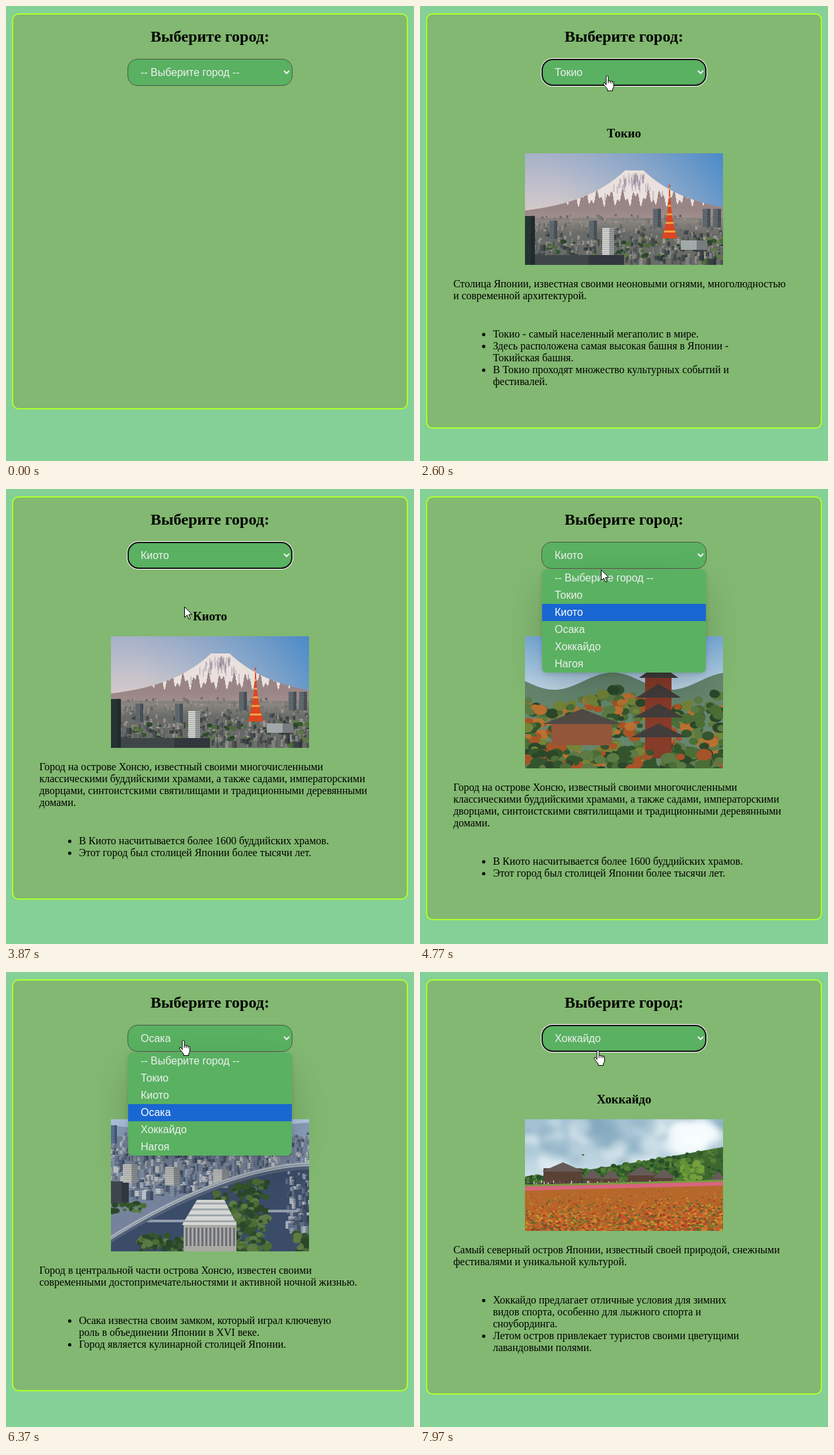
Write an HTML page with a canvas that moves like this. It is 618 px wide and 689 px high and loops after 8000 ms.

```html
<!DOCTYPE html>
<html lang="ru">
<head>
<meta charset="utf-8">
<title>Выбор города</title>
<style>
  html, body { margin: 0; width: 100%; height: 100%; overflow: hidden; background: #85d096; }
  #stage { position: relative; width: 618px; height: 689px; overflow: hidden;
    font: 16px/18px "Liberation Serif", "Times New Roman", serif; color: #000; }
  #stage > * { position: absolute; box-sizing: border-box; margin: 0; white-space: pre; }
  #panel { left: 9px; top: 11px; width: 600px; background: #82b871; border: 2px solid #adff2f; border-radius: 10px; }
  h2, h3 { left: 9px; width: 600px; text-align: center; }
  h2 { top: 33px; font-size: 24px; line-height: 27px; }
  h3 { top: 182px; font-size: 18.72px; line-height: 21px; }
  canvas { left: 159px; top: 223px; }
  #about { left: 50.400px; }
  #facts { left: 110.400px; padding: 0; list-style: disc; }
  #select, #popup { font: 16px "Liberation Sans", Arial, sans-serif; color: #f0f0f0; background: #59b161; }
  #select { left: 184px; top: 80px; width: 250px; height: 41px; line-height: 39px; padding-left: 19px;
    border: 1px solid #4b5a4c; border-radius: 15px; }
  #select.ring { border: 2px solid #101010; border-radius: 17px; line-height: 37px; padding-left: 18px; box-shadow: 0 0 0 1px #fff; }
  #popup { left: 185px; top: 122px; width: 248px; height: 156px; border-radius: 7px;
    box-shadow: 0 24px 60px -4px rgba(0, 0, 0, .2), 0 2px 6px rgba(0, 0, 0, .14); }
  #popup div { height: 26px; line-height: 25px; padding-left: 19px; }
  #popup div:first-child { border-radius: 7px 7px 0 0; }
  #popup div:last-child { border-radius: 0 0 7px 7px; }
  #popup .hot { background: #1967d2; color: #fff; }
  #chevron { left: 419px; top: 95px; }
  .cursor { left: 0; top: 0; overflow: visible; }
</style>
</head>
<body>
<div id="stage">
  <div id="panel"></div>
  <h2>Выберите город:</h2>
  <div id="select"></div>
  <svg id="chevron" width="12" height="10"><path d="M2 3l4 4 4-4" fill="none" stroke="#f0f0f0" stroke-width="2"/></svg>
  <h3 id="name"></h3>
  <p id="about"></p>
  <ul id="facts"></ul>
  <div id="popup"></div>
  <svg class="cursor" id="arrow" width="14" height="21"><path d="M.5 .5V16.500L4.300 13 7 19 9.400 18 6.800 12H11.800Z" fill="#fff" stroke="#000"/></svg>
  <svg class="cursor" id="hand" width="18" height="25">
    <path d="M5 14.500V2.200a1.600 1.600 0 0 1 3.200 0V8.500q1.500-1.200 3 .4 1.600-.9 2.800.6 2.300-.8 2.500 1.500V16q0 2.500-1.800 5v2.500H7V21Q4.500 18 1 13.500q-.8-2 1-2.200 1.500 0 3 3.200Z" fill="#fff" stroke="#000"/>
    <path d="M8.200 8v4M11.200 9v3M14 9.600v3" stroke="#000"/>
  </svg>
</div>
<script>
const LOOP = 8000, LOAD = 30, ROW = 26;
const $ = id => document.getElementById(id);

const cities = [
  { name: '-- Выберите город --' },
  { name: 'Токио',
    about: 'Столица Японии, известная своими неоновыми огнями, многолюдностью\nи современной архитектурой.',
    facts: ['Токио - самый населенный мегаполис в мире.',
      'Здесь расположена самая высокая башня в Японии -\nТокийская башня.',
      'В Токио проходят множество культурных событий и\nфестивалей.'] },
  { name: 'Киото',
    about: 'Город на острове Хонсю, известный своими многочисленными\nклассическими буддийскими храмами, а также садами, императорскими\nдворцами, синтоистскими святилищами и традиционными деревянными\nдомами.',
    facts: ['В Киото насчитывается более 1600 буддийских храмов.',
      'Этот город был столицей Японии более тысячи лет.'] },
  { name: 'Осака',
    about: 'Город в центральной части острова Хонсю, известен своими\nсовременными достопримечательностями и активной ночной жизнью.',
    facts: ['Осака известна своим замком, который играл ключевую\nроль в объединении Японии в XVI веке.',
      'Город является кулинарной столицей Японии.'] },
  { name: 'Хоккайдо',
    about: 'Самый северный остров Японии, известный своей природой, снежными\nфестивалями и уникальной культурой.',
    facts: ['Хоккайдо предлагает отличные условия для зимних\nвидов спорта, особенно для лыжного спорта и\nсноубординга.',
      'Летом остров привлекает туристов своими цветущими\nлавандовыми полями.'] },
  { name: 'Нагоя' },
];

// Each visit: go over the select, open it, drop to a row, pick the next city.
const visits = [
  { go: [200, 770], over: [290, 92], open: 1030, drop: [1470, 1800], row: [284, 161], pick: 2070 },
  { go: [2330, 2600], over: [283.5, 105], open: 2770, drop: [3030, 3370], row: [270, 178], pick: 3870 },
  { go: [3900, 4370], over: [274, 103], open: 4430, drop: [4700, 5200], row: [271, 221], pick: 5570 },
  { go: [5700, 6200], over: [268, 103], open: 6270, drop: [6470, 6970], row: [257, 233], pick: 7500 },
  { go: [7530, 7970], over: [269.5, 118] },
];
const START = [545, 520];
const legs = visits.flatMap(v => [[v.go, v.over], [v.drop, v.row]]).filter(leg => leg[0]);

// ---- pictures ----
function seeded(s) {
  return () => {
    s = (s + 0x6d2b79f5) | 0;
    let t = Math.imul(s ^ (s >>> 15), 1 | s);
    t = (t + Math.imul(t ^ (t >>> 7), 61 | t)) ^ t;
    return ((t ^ (t >>> 14)) >>> 0) / 4294967296;
  };
}

function brush(g, seed) {
  const rnd = seeded(seed);
  const span = (a, b) => a + rnd() * (b - a);
  const pick = list => list[Math.floor(rnd() * list.length)];
  const rect = (c, x, y, w, h) => { g.fillStyle = c; g.fillRect(x, y, w, h); };
  const fade = (y0, y1, ...colors) => {
    const f = g.createLinearGradient(0, y0, 0, y1);
    colors.forEach((c, i) => f.addColorStop(i / (colors.length - 1), c));
    rect(f, 0, y0, 300, y1 - y0);
  };
  // Fills between two curves of x
  const band = (c, top, low = () => 200, x0 = 0, x1 = 300) => {
    for (let x = x0; x < x1; x++) rect(c, x, top(x), 1, Math.max(0, low(x) - top(x)));
  };
  const blobs = (n, x0, x1, top, low, r, colors) => {
    for (let i = 0; i < n; i++) {
      const x = span(x0, x1), s = r * span(.5, 1.2);
      g.fillStyle = pick(colors);
      g.beginPath();
      g.ellipse(x, span(top(x), low), s, s * .75, 0, 0, 7);
      g.fill();
    }
  };
  const block = (c, x, y, w, h) => {
    rect(c, x, y, w, h);
    rect('rgba(20,25,35,.3)', x + w * .6, y, w * .4, h);
    for (let j = 2; j < h; j += 3) rect('rgba(30,35,50,.2)', x, y + j, w, 1);
  };
  // Buildings grow from the back row to the front
  const town = (n, x0, x1, y0, y1, size, colors) => {
    for (let i = 0; i < n; i++) {
      const k = i / n, s = size * (.4 + k * .6);
      block(pick(colors), span(x0, x1), y0 + (y1 - y0) * k, s * span(.4, 1), s * span(.5, 1.3));
    }
  };
  const roof = (c, x, y, w, h) => band(c, i => y + h * Math.abs(i - x) / w, () => y + h, x - w, x + w);
  return { rnd, span, pick, rect, fade, band, blobs, block, town, roof };
}

const flat = y => () => y;
const greens = ['#34542d', '#4b6d36', '#2b472a', '#5c7a44'];

function tokyo(g) {
  const b = brush(g, 11);
  b.fade(0, 100, '#7f9fc8', '#b4bdd0', '#e8d5c4');
  const side = g.createLinearGradient(60, 90, 300, 0);
  side.addColorStop(0, 'rgba(205,195,200,.5)');
  side.addColorStop(1, 'rgba(65,135,200,.85)');
  b.rect(side, 0, 0, 300, 100);
  const slope = x => 26 + 70 * (1 - Math.exp(-Math.max(0, Math.abs(x - 165) - 14) / 75));
  const snow = x => 68 + 8 * Math.sin(x * .33) + 5 * Math.sin(x * .8);
  b.band('#9a8586', slope);
  b.band('#eae0dd', slope, snow);
  for (let i = 0; i < 60; i++) {
    const k = b.rnd(), x = 165 + b.span(-60, 60) * k;
    b.rect('rgba(125,118,142,.4)', x, slope(x) + b.span(4, 20), 1.5, b.span(5, 16));
  }
  b.rect('#686b67', 0, 98, 300, 71);
  b.town(420, -6, 300, 92, 162, 10, ['#83847f', '#97958d', '#5d6465', '#454e50', '#6c6e68', '#50574f', '#a6a198']);
  b.blobs(70, 30, 300, flat(128), 166, 4, greens);
  b.town(50, 20, 292, 135, 164, 13, ['#505759', '#73756f', '#3b4548', '#858780']);
  b.fade(84, 122, 'rgba(168,155,150,0)', 'rgba(168,155,150,.55)', 'rgba(168,155,150,0)');
  for (const x of [37, 97, 194, 269, 285]) b.block('#626b70', x, 84 + 18 * (x < 150), 12, 28);
  b.block('#cfd1cc', 117, 113, 18, 43);
  b.block('#abb2b1', 236, 132, 40, 14);
  b.block('#263432', 0, 95, 15, 74);
  b.block('#41484a', 15, 154, 135, 15);
  for (let y = 47; y < 129; y++) {
    const k = (y - 47) / 82, w = .8 + 11 * k ** 2.2;
    b.rect(y % 13 < 3 ? '#f0a044' : '#dc4620', 219 - w, y, w * 2, 1);
  }
}

function kyoto(g) {
  const b = brush(g, 23);
  b.fade(0, 110, '#78abd8', '#d9e5ea');
  const hills = x => 68 + 13 * Math.sin(x / 28);
  b.band('#65866f', hills);
  b.blobs(420, 0, 300, x => hills(x) + 25, 200, 9, [...greens, '#a85427', '#b97132', '#748438']);
  b.rect('#873b29', 182, 60, 40, 125);
  for (let i = 0; i < 4; i++) b.roof('#423d3b', 202, 42 + i * 30, 30 + i * 4, 21);
  b.rect('#94563b', 40, 133, 92, 32);
  b.roof('#514b46', 86, 110, 60, 23);
  b.blobs(100, 0, 300, flat(174), 204, 10, [...greens, '#a65328']);
}

function osaka(g) {
  const b = brush(g, 37);
  b.fade(0, 24, '#b0c7e2', '#a9b9cf');
  b.rect('#75849c', 0, 16, 300, 184);
  b.band('#8a9eb9', x => 9 + 4 * Math.sin(x / 28), flat(26));
  b.town(650, -6, 300, 18, 110, 13, ['#8292aa', '#a5b1bf', '#c6ccd2', '#6b7b95', '#8f9cad', '#56657f', '#b5bdc6']);
  for (const x of [0, 172, 182, 195]) b.block('#5f7899', x, 9, 9, 27);
  const road = x => 176 - 111 * (1 - (1 - x / 300) ** 1.7);
  b.band('#3b4c69', x => road(x) + 10);
  b.blobs(70, 40, 115, flat(176), 200, 6, greens);
  b.blobs(230, 160, 238, x => Math.max(92, road(x) + 16), 200, 6, greens);
  b.town(60, 264, 300, 78, 166, 15, ['#8d9bad', '#b4bbc3', '#60718a', '#47566f']);
  b.blobs(25, 280, 300, flat(172), 200, 6, greens);
  b.rect('#929dab', 40, 152, 74, 4);
  b.rect('#929dab', 238, 137, 46, 4);
  b.block('#41484d', 0, 94, 27, 34);
  for (const x of [18, 82, 155]) b.block('#c3c5c3', x, 68 + x % 9 * 4, 22, 28);
  b.blobs(25, 0, 50, flat(126), 140, 5, greens);
  b.band('#536178', road, x => road(x) + 11);
  b.band('#abb4bd', road, x => road(x) + 6);
  b.band('#717e90', x => road(x) + 3, x => road(x) + 4);
  b.rect('#aaa9a4', 110, 154, 80, 46);
  for (let x = 113; x < 188; x += 6) b.rect('#6b7078', x, 164, 3, 28);
  for (let y = 122; y < 160; y++) b.rect(y % 9 < 3 ? '#a1a7ad' : '#d5d7d4', 130 - (y - 122) * .6, y, 42 + (y - 122) * 1.1, 1);
}

function hokkaido(g) {
  const b = brush(g, 51);
  b.fade(0, 95, '#a2c0d2', '#cbdfe8');
  g.filter = 'blur(5px)';
  b.blobs(50, 0, 300, flat(0), 70, 20, ['rgba(232,243,247,.45)', 'rgba(130,167,189,.4)']);
  b.blobs(12, 220, 300, flat(10), 42, 26, ['rgba(248,253,255,.6)']);
  g.filter = 'none';
  const hill = x => 88 - 46 * (x / 300) ** 1.2;
  b.band('#3c682f', hill);
  b.blobs(380, 0, 300, hill, 96, 4, ['#315b29', '#447230', '#548038', '#264d27']);
  for (const x of [240, 250, 260]) b.blobs(14, x - 8, x + 8, flat(62), 90, 6, ['#629336', '#759f3c', '#4b7b30']);
  for (const [x, w] of [[57, 32], [102, 16], [130, 15], [176, 23], [210, 17], [292, 12]]) {
    const top = 86 - w * .65;
    b.rect('#594235', x - w + 3, top + 9, w * 2 - 6, 98 - top - 9);
    b.roof('#665b59', x, top, w, 14);
  }
  for (let i = 0; i < 110; i++) b.rect(b.pick(['#302e35', '#d9d2cc', '#8a4a4c', '#405171']), b.span(0, 215), b.span(92, 97), 1.5, 4);
  const edge = x => 108 - x / 40;
  b.band('#7c9a41', x => edge(x) - 9);
  b.band('#d9647f', x => edge(x) - 6);
  b.band('#b5682a', edge);
  for (let i = 0; i < 1700; i++) {
    const k = Math.sqrt(i / 1700), s = 1 + k * 2.5, x = b.span(0, 300);
    b.rect(b.pick(['#cf4a2a', '#d9692a', '#cc982e', '#9c3d22', '#76732f', '#c98630', '#596430', '#b85826']), x, edge(x) + k * 66, s * 1.4, s);
  }
  b.blobs(1, 88, 88, flat(54), 54, 3, ['#3d7d48']);
}

const photos = [[tokyo, 169], [kyoto, 200], [osaka, 200], [hokkaido, 169]].map(([draw, h]) => {
  const c = document.createElement('canvas');
  c.width = 300;
  c.height = h;
  draw(c.getContext('2d'));
  $('stage').insertBefore(c, $('popup'));
  return c;
});

// ---- playback ----
const rows = cities.map(c => {
  const row = document.createElement('div');
  row.textContent = c.name;
  return $('popup').appendChild(row);
});

const picked = t => visits.filter(v => v.pick <= t).length;
const show = (el, on) => { el.style.visibility = on ? 'visible' : 'hidden'; };
const move = (el, x, y) => { el.style.transform = `translate(${Math.round(x)}px, ${Math.round(y)}px)`; };
const height = s => s.split('\n').length * 18;

// Quick start, soft landing
function ease(p) {
  const q = 1 - (1 - p) ** 1.9;
  return q * q * (3 - 2 * q);
}

function pointer(t) {
  let pos = START;
  for (const [[t0, t1], to] of legs) {
    const e = ease(Math.min(1, Math.max(0, (t - t0) / (t1 - t0))));
    pos = pos.map((v, i) => v + (to[i] - v) * e);
  }
  return pos;
}

let shown = -1;
function fillPage(n) {
  if (n === shown) return;
  shown = n;
  const { name, about = '', facts = [] } = cities[n];
  $('select').textContent = name;
  $('name').textContent = n ? name : '';
  $('about').textContent = about;
  $('facts').replaceChildren(...facts.map(f => {
    const li = document.createElement('li');
    li.textContent = f;
    return li;
  }));
}

function layout(n, photo) {
  const { about = '', facts = [] } = cities[n];
  const top = 243 + (photo ? photos[photo - 1].height : 0);
  const factsTop = top + height(about) + 40;
  const bottom = Math.max(611, factsTop + height(facts.join('\n')) + 62);
  $('about').style.top = top + 'px';
  $('facts').style.top = factsTop + 'px';
  $('panel').style.height = bottom - 11 + 'px';
}

function render(t) {
  const n = picked(t), photo = picked(t - LOAD);
  fillPage(n);
  layout(n, photo);
  photos.forEach((c, i) => show(c, i + 1 === photo));

  const [x, y] = pointer(t);
  const visit = visits.find(v => t >= v.open && t < v.pick);
  const hot = y < 122.5 ? n : Math.floor((y - 122.5) / ROW);
  show($('popup'), visit);
  if (visit) $('popup').style.opacity = Math.min(1, .4 + (t - visit.open) / 150);
  rows.forEach((r, i) => { r.className = i === hot ? 'hot' : ''; });
  $('select').className = t >= visits[0].open - LOAD && !visit ? 'ring' : '';

  const here = t >= visits[0].go[0];
  const over = x > 184 && x < 434 && y > 80 && y < 121;
  show($('arrow'), here && !over);
  show($('hand'), here && over);
  move($('arrow'), x, y);
  move($('hand'), x - 6.5, y);
}

function tick() {
  render(performance.now() % LOOP);
  requestAnimationFrame(tick);
}
tick();
</script>
</body>
</html>
```
